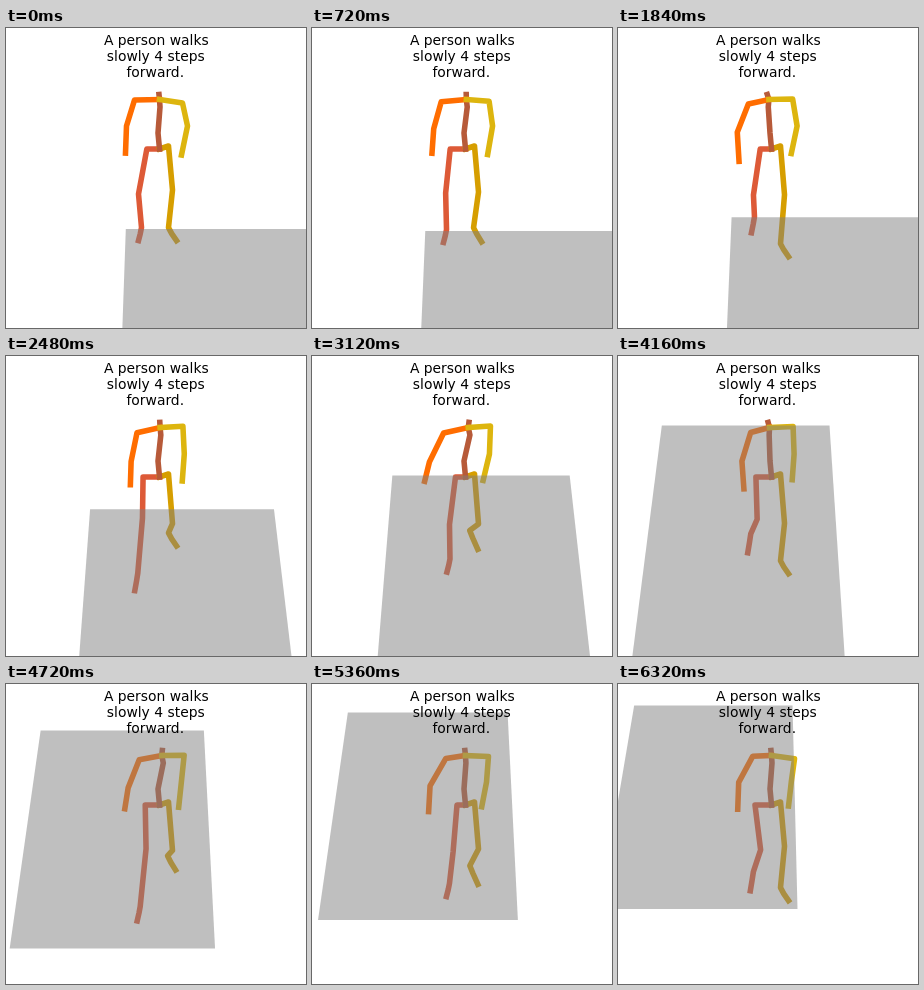
An HTML page for the animation above (6400 ms loop, 300x300 px).

```html
<!DOCTYPE html>
<html lang="en">
<head>
<meta charset="utf-8">
<style>
html, body { margin: 0; width: 100%; height: 100%; overflow: hidden; background: #fff; }
svg { display: block; width: 300px; height: 300px; }
polyline { fill: none; stroke-width: 5.56; stroke-linecap: square; stroke-linejoin: round; }
text { font: 13.89px "DejaVu Sans", sans-serif; text-anchor: middle; }
</style>
</head>
<body>
<svg viewBox="0 0 300 300">
  <g id="figure" transform="translate(-.5 0)"></g>
  <polygon id="ground" fill="#808080" fill-opacity=".5"/>
  <text x="150.3" y="17">A person walks</text>
  <text x="149.8" y="33">slowly 4 steps</text>
  <text x="149.3" y="49">forward.</text>
</svg>
<script>
const LOOP = 6.4, STEP = 0.08;      // seconds
const STRIDE = 1.95, SWING = 1.15;  // full gait cycle, time one foot is in the air
const VANISH_X = 154.5, VANISH_Y = -797, PLANE = 0.0002433;

const { sin, cos, exp, log, PI } = Math;
const clamp = v => Math.min(Math.max(v, 0), 1);
const smooth = p => p * p * (3 - 2 * p);
const softRamp = (x, width) => width * log(1 + exp(x / width));

// Distance walked, as a share of the ground's length: rest, steady pace, rest.
const walked = t =>
  0.25 * (softRamp(t - 1.62, 0.1) - softRamp(t - 5.28, 0.32)) + 0.008 * exp(-4 * t);

// Perspective scale of a point lying `depth` in front of the far edge.
const scaleAt = (t, depth) => 1 / (0.001 + PLANE * (walked(t) - depth));

const gait = t => 2 * PI * (t - 3.4) / STRIDE;

// One foot steps every two seconds and stays planted in between.
function foot(firstStep, t) {
  let depth = 0.047, lift = 0;
  for (let start = firstStep; start < t; start += 2) {
    const p = clamp((t - start) / SWING);
    const target = 1.07 * walked(start + 1.6) - 0.008;
    depth += (target - depth) * smooth(p);
    lift = sin(PI * p);
  }
  return { y: VANISH_Y + scaleAt(t, depth) - 5 * lift, lift };
}

// Heel, ball and toe; splay is how far the heel sits to the right of the toe.
function footJoints(x, { y, lift }, splay) {
  return [[x + splay, y - 13 - 6 * lift], [x + splay * 0.6, y - 7 - 4 * lift], [x, y]];
}

function pose(t) {
  const energy = sin(PI * t / LOOP);
  const side = cos(gait(t)), sway = energy * side, swing = energy * sin(gait(t));
  const lean = -5 * swing, tilt = 5 * energy;
  const root = [154, 121], neck = [154 + 0.7 * lean, 71.5];
  const right = foot(1.65, t), left = foot(0.65, t);
  return [
    [root, [141.5 + 4 * side, 121], [133 + 1.6 * t, 166 + 4 * sway],
      ...footJoints(133 + 4 * sway, right, 3)],
    [root, [163, 118], [167, 162 + 6 * energy],
      ...footJoints(171 - 5 * left.lift, left, -8)],
    [root, [152.5, 105], [154.5 + lean, 79], neck, [153.5 + lean, 66.5]],
    [neck, [129 + t, 72 + tilt], [121 - 5 * sway, 98 + 8 * energy],
      [120 - 6 * sway + 4 * swing, 125 + tilt + 6 * swing]],
    [neck, [177 + 0.5 * lean, 75 - tilt], [182 - 1.3 * t, 98],
      [176 - 0.8 * t - 3 * sway, 127 - 0.8 * t]]
  ];
}

function groundCorners(t) {
  const left = (-33.4 - 2 * t - 125 * walked(t) + 9 * cos(gait(t))) / 1000;
  const right = left + 0.1935;
  const far = scaleAt(t, 0), near = scaleAt(t, 1);
  const corner = (slope, scale) => [VANISH_X + slope * scale, VANISH_Y + scale];
  return [corner(left, far), corner(right, far), corner(right, near), corner(left, near)];
}

const figure = document.getElementById("figure");
const ground = document.getElementById("ground");
const limbs = ["#DD5A37", "#D69E00", "#B75A39", "#FF6D00", "#DDB50E"].map(color => {
  const line = document.createElementNS("http://www.w3.org/2000/svg", "polyline");
  line.setAttribute("stroke", color);
  return figure.appendChild(line);
});

const begin = performance.now();
function tick() {
  const elapsed = (performance.now() - begin) / 1000 % LOOP;
  const t = Math.floor(elapsed / STEP + 1e-6) * STEP;
  pose(t).forEach((joints, i) => limbs[i].setAttribute("points", joints.join(" ")));
  ground.setAttribute("points", groundCorners(t).join(" "));
  requestAnimationFrame(tick);
}
tick();
</script>
</body>
</html>
```
